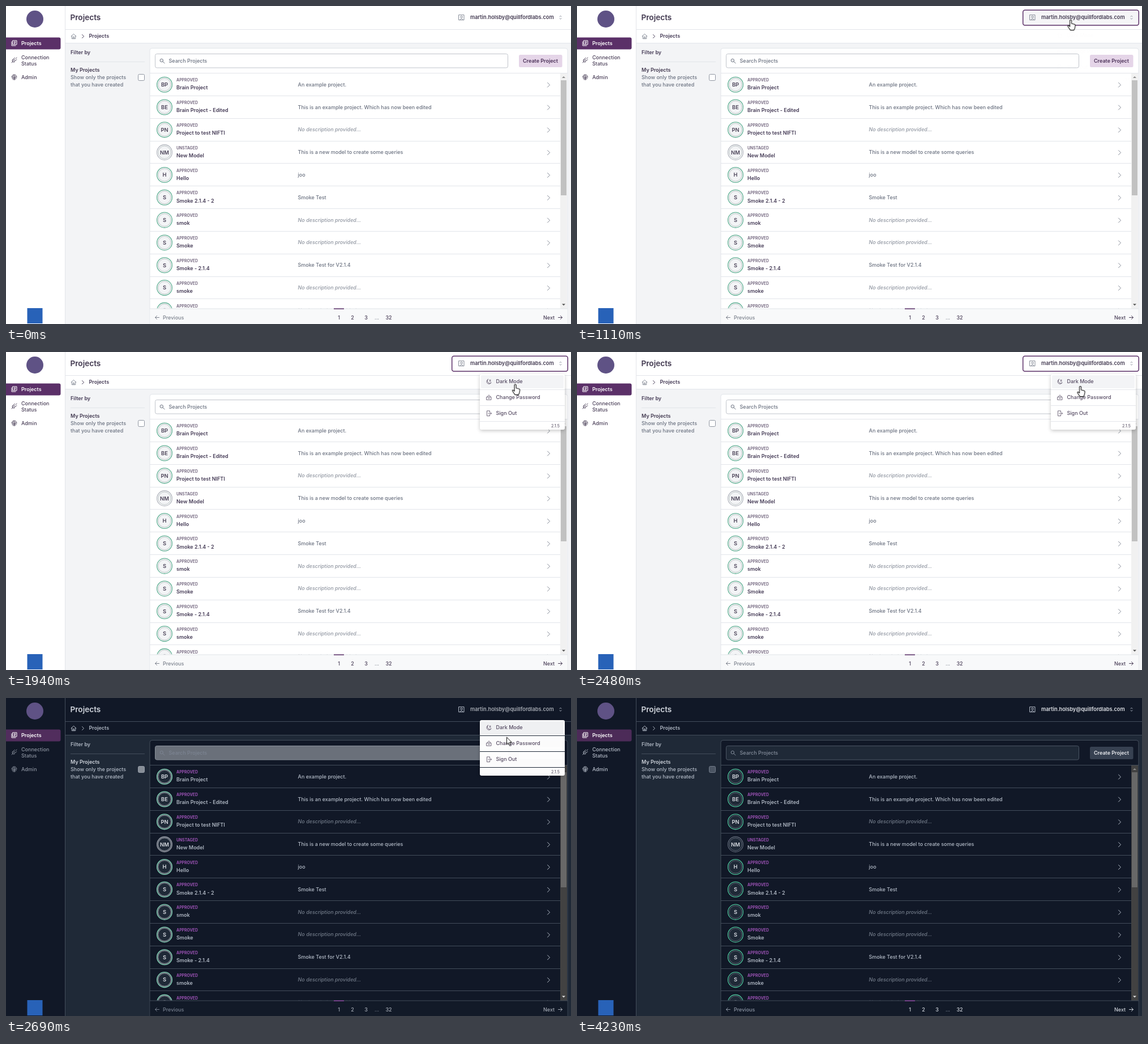
Write an HTML page that moves like this. It is 998 by 561 pixels and loops after 4360 ms.

```html
<!DOCTYPE html>
<html lang="en">
<head>
<meta charset="utf-8">
<title>Projects</title>
<style>
  html, body { margin: 0; width: 100%; height: 100%; overflow: hidden; background: var(--page); }
  svg { display: block; width: 998px; height: 561px; }
  text { font: 500 9px Inter, sans-serif; white-space: pre; }
  .semi { font-weight: 600; }
  .bold { font-weight: 700; }
  .line { fill: none; stroke-width: 1; stroke-linecap: round; stroke-linejoin: round; }
  .shadow { filter: drop-shadow(0 2px 3px rgb(0 0 0 / .22)); }
</style>
</head>
<body>
<svg id="stage" viewBox="0 0 998 561"></svg>
<script>
const LOOP = 4360;
const SWITCH = 2550;   // theme flips here, slow colours settle by SETTLED
const SETTLED = 2760;

// name: [light, just after the switch, dark]; two entries mean an instant change
const theme = {
  page: ['#ffffff', '#111827'],
  panel: ['#f3f4f6', '#1f2937'],
  footer: ['#f8f9fa', '#121a28'],
  line: ['#e2e5ea', '#434d5b'],
  head: ['#41384f', '#cfd4dc'],
  name: ['#453b56', '#aeb6c2'],
  desc: ['#6b7280', '#b4bcc8'],
  missing: ['#9096a1', '#727b89'],
  label: ['#7b6f86', '#9a52b3'],
  ring: ['#5fae93', '#d8efe7', '#4fc29b'],
  unstaged: ['#b4b8c0', '#f0f1f3', '#5a6372'],
  gap: ['#ffffff', '#ffffff', '#111827'],
  disc: ['#f3f4f6', '#1f2937'],
  inner: ['#a9b4b5', '#e5e7eb', '#717b89'],
  initials: ['#4b4358', '#d9dde3'],
  nav: ['#4a3f58', '#343c4b', '#b6bdc9'],
  active: ['#5b3068', '#5b3068', '#4c2b58'],
  input: ['#ffffff', '#ffffff', '#1f2937'],
  inputLine: ['#c0c4cb', '#ffffff', '#4b5563'],
  inputText: ['#6b7280', '#6b7280', '#848d9b'],
  check: ['#ffffff', '#ffffff', '#4b5563'],
  checkLine: ['#8f95a0', '#dddfe3', '#737c8a'],
  button: ['#e5d5e8', '#e5d5e8', '#374151'],
  buttonText: ['#4b3158', '#4b3158', '#e8eaee'],
  email: ['#41384f', '#333a49', '#e0e3e8'],
  pageNumber: ['#4a3f58', '#4b5563', '#d0d5dc'],
  prev: ['#7c828d', '#4b5563', '#8b94a3'],
  chevron: ['#858b97', '#b4bcc8'],
  track: ['#f1f1f1', '#424242'],
  thumb: ['#c1c1c1', '#686868'],
  scrollArrow: ['#505050', '#e5e5e5'],
  mark: ['#5b3068', '#8b479f'],
  divider: ['#e5e7eb', '#1f2937'],
};

const rows = [
  ['BP', 'Brain Project', 'An example project.'],
  ['BE', 'Brain Project - Edited', 'This is an example project. Which has now been edited'],
  ['PN', 'Project to test NIFTI'],
  ['NM', 'New Model', 'This is a new model to create some queries'],
  ['H', 'Hello', 'joo'],
  ['S', 'Smoke 2.1.4 - 2', 'Smoke Test'],
  ['S', 'smok'],
  ['S', 'Smoke'],
  ['S', 'Smoke - 2.1.4', 'Smoke Test for V2.1.4'],
  ['S', 'smoke'],
  ['S', 'Smoke'],
];

const color = c => theme[c] ? `var(--${c})` : c;
const rect = (x, y, w, h, fill, extra = '') =>
  `<rect x="${x}" y="${y}" width="${w}" height="${h}" fill="${color(fill)}" ${extra}/>`;
const text = (x, y, str, fill, extra = '') =>
  `<text x="${x}" y="${y}" fill="${color(fill)}" ${extra}>${str}</text>`;
const semi = 'class="semi"';
const path = (x, y, d, stroke) =>
  `<path class="line" transform="translate(${x} ${y})" d="${d}" stroke="${color(stroke)}"/>`;
const circle = (x, y, r, fill, stroke = 'none', width = 1) =>
  `<circle cx="${x}" cy="${y}" r="${r}" fill="${color(fill)}" stroke="${color(stroke)}" stroke-width="${width}"/>`;
const hLine = (x, y, w, c = 'line') => rect(x, y, w, 1, c);
const stroke = c => `stroke="${color(c)}"`;

const icon = {
  pages: 'M-2.5-4.5h7v7h-7zM-4.5-2.5v7h7M-.5-2.5h3M-.5-.8h3M-.5 .9h2',
  plug: 'M-4.5 4.5l2-2M-2.7-1l3.7 3.7q-2 2-3.7 0t0-3.7M1-4.2L-1.2-2M4.2-1L2 1.2M-1.2-2.2L2.2 1.2M2.5-2.5l2-2',
  print: 'M-3.5 2q1-6 3.5-5.5T3.5 2M-2 4Q-1-2 0-2T1.7 4M0 0v4.5M-4.5-.5Q-3.5-5 0-5T4.5-.5',
  home: 'M-4.5 0L0-4.2 4.5 0M-3.2-1v5.2h6.4V-1M-1 4V1h2v3',
  right: 'M-1.5-3L1.5 0-1.5 3',
  chevron: 'M-2-4L2 0-2 4',
  search: 'M1 1L4 4M1.5-1a2.7 2.7 0 1 1-5.4 0a2.7 2.7 0 1 1 5.4 0',
  user: 'M-4.5-4.5h9v9h-9zM1.7-1a1.7 1.7 0 1 1-3.4 0a1.7 1.7 0 1 1 3.4 0M-2.8 4Q0 0 2.8 4',
  upDown: 'M-1.5-1.5L0-3 1.5-1.5M-1.5 1.5L0 3 1.5 1.5',
  moon: 'M-1.5-4.2A4.3 4.3 0 1 0 4.2 1.5A4 4 0 0 1-1.5-4.2M1-3h2.2L1-.8h2.2',
  lock: 'M-4-1h8v5h-8zM-2-1v-1.5q2-3.5 4 0V-1M-1.5 1.5h3',
  exit: 'M1.5-2v-2.5h-5v9h5V2M-1 0h5.5M3-1.5L4.5 0 3 1.5',
  back: 'M3.5 0h-7M-.5-3l-3 3 3 3',
  next: 'M-3.5 0h7M.5-3l3 3-3 3',
};

const sidebar = () =>
  rect(0, 0, 104, 561, 'page') + rect(104, 0, 1, 561, 'line') +
  circle(51, 23, 15, '#5f5285') +
  `<path d="M0 55.500h93.500q3 0 3 3v15q0 3-3 3H0z" fill="${color('active')}"/>` +
  path(14.5, 65.5, icon.pages, '#fff') + text(27, 69, 'Projects', '#fff', semi) +
  path(14.5, 95.5, icon.plug, 'nav') + text(27, 93.7, 'Connection', 'nav') + text(27, 104.5, 'Status', 'nav') +
  path(14.5, 126, icon.print, 'nav') + text(27, 129, 'Admin', 'nav') +
  rect(37.5, 533, 27, 27, '#2862b8');

const header = () =>
  rect(105, 0, 893, 65, 'page') + hLine(105, 41, 893) + hLine(105, 65, 893) +
  text(113.5, 25, 'Projects', 'head', 'class="semi" style="font-size:13.6px"') +
  path(119.5, 53.5, icon.home, 'chevron') + path(136, 53.5, icon.right, 'name') +
  text(146.5, 56.3, 'Projects', 'name', semi);

const account = () =>
  rect(787.7, 7.2, 204.6, 26.8, '#f5f5f7', 'id="hover" rx="3.5"') +
  rect(787.7, 7.2, 204.6, 26.8, 'none', 'id="focus" rx="3.5" stroke="#5b3068" stroke-width="1.5"') +
  path(804.5, 20.2, icon.user, 'chevron') +
  text(820, 23.2, 'martin.holsby@quillfordlabs.com', 'email', 'class="semi" style="font-size:9.2px"') +
  path(979.5, 20.2, icon.upDown, 'chevron');

const filters = () =>
  text(114, 85, 'Filter by', 'name', semi) + hLine(114, 98, 131) +
  text(114, 115.5, 'My Projects', 'head', semi) +
  text(114, 129, 'Show only the projects', 'desc') + text(114, 142, 'that you have created', 'desc') +
  rect(233.5, 120.5, 11, 11, 'check', `rx="2" ${stroke('checkLine')}`);

const row = ([initials, name, desc], i) => {
  const y = 138.7 + i * 39.82;
  const fresh = initials === 'NM';
  return circle(280, y, 13.4, 'gap', fresh ? 'unstaged' : 'ring', 1.3) +
    circle(280, y, 11.2, 'disc', 'inner', .8) +
    text(280, y + 3.4, initials, 'initials', 'class="semi" text-anchor="middle" style="font-size:9.4px"') +
    text(301, y - 5.4, fresh ? 'UNSTAGED' : 'APPROVED', 'label', 'class="bold" style="font-size:6.9px"') +
    text(301, y + 8.7, name, 'name', semi) +
    text(515.5, y + 3, desc || 'No description provided...', desc ? 'desc' : 'missing',
      desc ? '' : 'style="font-style:italic"') +
    path(958.5, y + .5, icon.chevron, 'chevron') +
    hLine(254, Math.round(y + 19.3), 725);
};

const scrollbar = () =>
  rect(979, 119, 12, 415, 'track') + rect(980, 131, 10, 203, 'thumb') +
  `<path d="M982 127l3-3 3 3z" fill="#8c8c8c"/><path d="M982 525.5l3 3 3-3z" fill="${color('scrollArrow')}"/>`;

const pager = () =>
  rect(254.5, 534, 737, 28, 'footer') + hLine(254, 533.5, 738) + rect(579, 533.5, 18, 1.5, 'mark') +
  path(267, 549.5, icon.back, 'prev') + text(277, 552.6, 'Previous', 'prev') +
  [[588, '1'], [612, '2'], [636, '3'], [655, '...'], [676, '32']]
    .map(([x, s]) => text(x, 552.6, s, s === '...' ? 'prev' : 'pageNumber', 'text-anchor="middle"')).join('') +
  text(949, 552.6, 'Next', 'pageNumber') + path(979, 549.5, icon.next, 'pageNumber');

const list = () =>
  rect(254, 74.5, 738, 500, 'page', `rx="4" ${stroke('line')}`) +
  rect(263.5, 84.5, 623, 24.5, 'input', `rx="3" ${stroke('inputLine')}`) +
  path(276, 97, icon.search, 'inputText') + text(287.5, 100, 'Search Projects', 'inputText') +
  rect(906, 86, 76.5, 22, 'button', 'rx="2.5"') +
  text(944, 100, 'Create Project', 'buttonText', 'class="semi" text-anchor="middle"') +
  hLine(254, 118, 738) +
  `<g clip-path="url(#listClip)">${rows.map(row).join('')}</g>` + scrollbar() + pager();

const menu = () => `<g id="menu">` +
  rect(837, 39, 150, 98, '#fff', 'rx="3" class="shadow"') +
  rect(839, 41, 146, 23, '#f3f4f6', 'id="item" rx="2"') +
  [['Dark Mode', 'moon'], ['Change Password', 'lock'], ['Sign Out', 'exit']].map(([label, glyph], i) => {
    const y = 52.3 + i * 28;
    return path(853, y, icon[glyph], '#746b7e') + text(865.5, y + 3, label, '#554a62') +
      hLine(837, 66 + i * 28, 150, 'divider');
  }).join('') +
  text(978, 132.6, '2.1.5', '#625a6d', 'text-anchor="end" style="font-size:7px"') + '</g>';

const pointer = () => `<g id="pointer" stroke="#111" stroke-linejoin="round">
  <path id="arrow" fill="#fff" d="M.5 .5v12.5l2.9-2.7 1.9 4.3 2-.9-1.9-4.2h3.9z"/>
  <path id="hand" fill="#fff" transform="scale(1.12)" d="M-1.3 1.2q1.4-1.8 2.7 0v5l4.4 1.1q1.7.5 1.5 2.2l-.9 4.5-1.2 2.5H-.5l-3.900-5.700q-.5-2 1.300-1.400l1.800 1.600z"/>
  <path id="beam" fill="none" stroke="#e8e8e8" d="M-3-5.5h2.2L0-5l.8-.5H3M0-5V5M-3 5.5h2.2L0 5l.8.5H3"/>
</g>`;

document.getElementById('stage').innerHTML =
  '<clipPath id="listClip"><rect x="254" y="118" width="725" height="415.5"/></clipPath>' +
  rect(105, 66, 893, 495, 'panel') +
  sidebar() + header() + account() + filters() + list() + menu() + pointer();

// keys: [time, properties, easing until the next key]
const play = (el, keys) => el.animate(
  keys.map(([t, props, easing = 'steps(1)']) => ({ offset: t / LOOP, easing, ...props })),
  { duration: LOOP, iterations: Infinity });

const show = (id, ...spans) => play(document.getElementById(id), [
  [0, { opacity: 0 }],
  ...spans.flatMap(([from, to]) => [[from, { opacity: 1 }], [to, { opacity: 0 }]]),
  [LOOP, { opacity: 0 }],
]);

const palette = pick => Object.fromEntries(
  Object.entries(theme).map(([name, shades]) => [`--${name}`, pick(shades)]));
const light = palette(s => s[0]), mixed = palette(s => s[1]), dark = palette(s => s.at(-1));
for (const [name, initialValue] of Object.entries(light))
  CSS.registerProperty({ name, syntax: '<color>', inherits: true, initialValue });

play(document.documentElement, [
  [0, light], [SWITCH, light], [SWITCH, mixed, 'steps(3)'], [SETTLED, dark], [LOOP, dark],
]);

const at = (x, y) => ({ transform: `translate(${x}px, ${y}px)` });
play(document.getElementById('pointer'), [
  [0, at(966, 528)],
  [130, at(966, 528), 'steps(3)'],
  [340, at(922, 190), 'steps(3)'],
  [555, at(892, 62), 'steps(2)'],
  [690, at(884, 46), 'steps(5)'],
  [1040, at(872, 24)],
  [1240, at(872, 24), 'steps(4)'],
  [1515, at(873, 40), 'steps(3)'],
  [1730, at(880, 50), 'steps(4)'],
  [2010, at(906, 59), 'steps(5)'],
  [2350, at(889, 60)],
  [2620, at(889, 60), 'steps(3)'],
  [2830, at(874, 86)],
  [3300, at(874, 86), 'steps(5)'],
  [3650, at(950, 548)],
  [LOOP, at(950, 548)],
]);
show('arrow', [130, 830], [1445, 1590], [2690, 2830], [3370, 3700]);
show('hand', [830, 1445], [1590, 2690]);
show('beam', [2830, 3370]);
show('hover', [830, 1590]);
show('focus', [1040, 2690]);
show('item', [1590, 2760]);
play(document.getElementById('menu'), [
  [0, { opacity: 0 }],
  [1110, { opacity: 0 }, 'linear'],
  [1180, { opacity: 1 }],
  [2690, { opacity: 1 }, 'linear'],
  [2760, { opacity: 0 }],
  [LOOP, { opacity: 0 }],
]);
</script>
</body>
</html>
```
